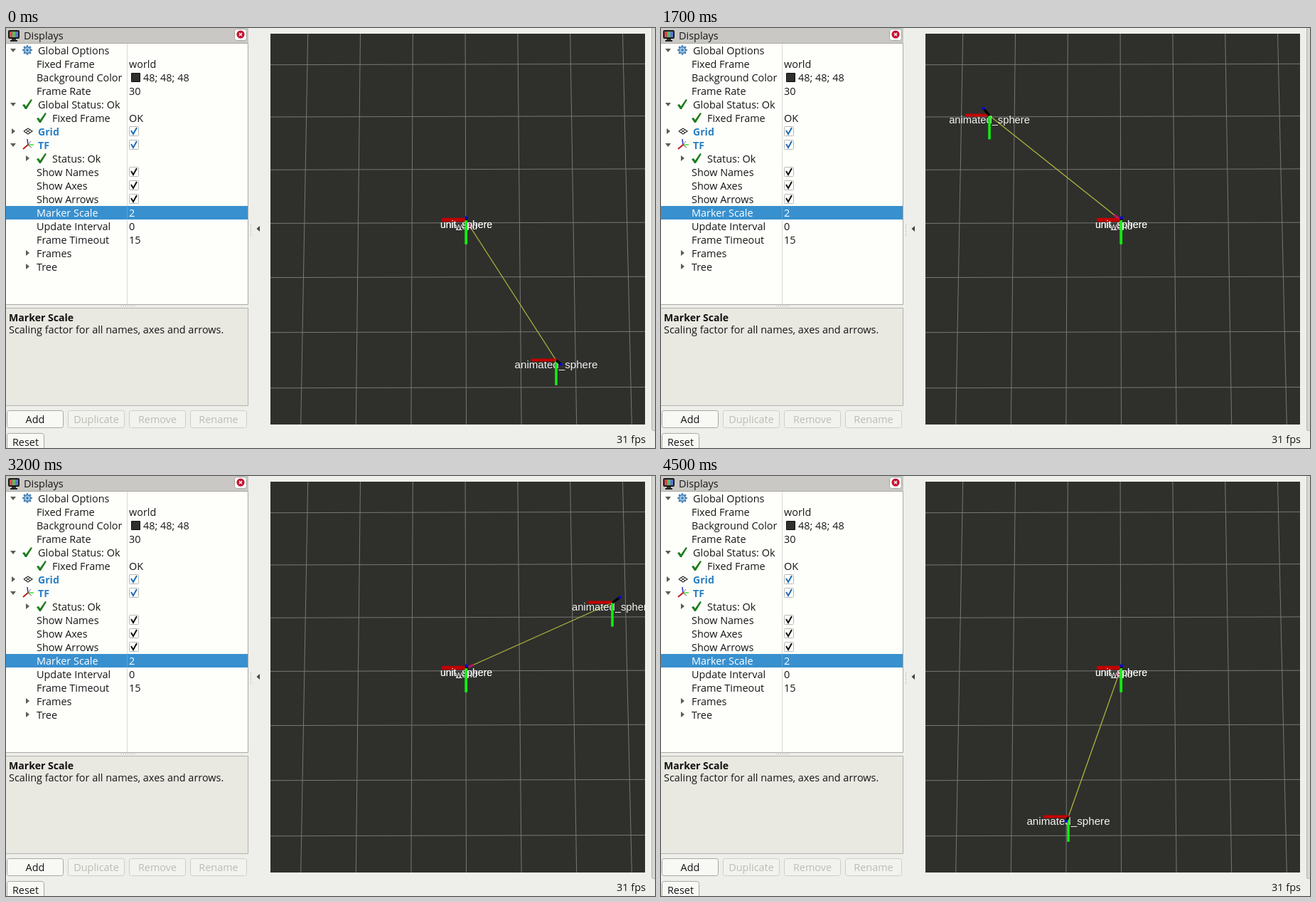
Animation, 913 px wide and 590 px high, one loop 4.7 s. Source, as an HTML page with a canvas:

```html
<!DOCTYPE html>
<html lang="en">
<head>
<meta charset="utf-8">
<title>Displays</title>
<style>
html, body { margin: 0; width: 913px; height: 590px; overflow: hidden; }
canvas { display: block; }
</style>
</head>
<body>
<canvas id="stage" width="913" height="590"></canvas>
<script>
const ctx = document.getElementById('stage').getContext('2d');
const UI = '14.45px "Open Sans", sans-serif';
const UI_BOLD = 'bold 14.1px "Open Sans", sans-serif';
const LOOP = 4700, TICK = 100;
const CENTER = { x: 647, y: 270 };

// Ticks on which the tracked frame receives no update
const HOLDS = [6, 12, 16, 21, 31, 36, 46];
// [update count, x, y] of the moving frame
const KEYS = [
  [0, 774, 467], [5, 578.5, 481], [8, 462, 425], [10, 442.5, 360], [13, 442, 191],
  [14, 462, 123], [17, 529.5, 72], [19, 634, 57], [23, 787, 78], [26, 844, 142],
  [27, 853, 178], [30, 855, 347], [31, 839, 416], [36, 704.5, 482], [39, 573, 479]
];

const bulge = a => 225 - 15 * Math.cos(4 * a);
let turn = -Infinity;
const PATH = KEYS.map(([step, x, y]) => {
  let angle = Math.atan2(y - CENTER.y, x - CENTER.x);
  while (angle < turn) angle += 2 * Math.PI;
  turn = angle;
  return { step, angle, extra: Math.hypot(x - CENTER.x, y - CENTER.y) - bulge(angle) };
});

function position(time) {
  const tick = Math.floor(time / TICK);
  const step = tick - HOLDS.filter(h => h <= tick).length;
  const i = Math.max(1, PATH.findIndex(p => p.step >= step));
  const a = PATH[i - 1], b = PATH[i];
  const k = (step - a.step) / (b.step - a.step);
  const angle = a.angle + (b.angle - a.angle) * k;
  const r = bulge(angle) + a.extra + (b.extra - a.extra) * k;
  return { x: CENTER.x + r * Math.cos(angle), y: CENTER.y + r * Math.sin(angle) };
}

function rect(x, y, w, h, fill, border, radius = 0) {
  ctx.beginPath();
  const d = border ? 0.5 : 0;
  ctx.roundRect(x + d, y + d, w - 2 * d, h - 2 * d, radius);
  ctx.fillStyle = fill;
  ctx.fill();
  if (border) {
    ctx.strokeStyle = border;
    ctx.lineWidth = 1;
    ctx.stroke();
  }
}

function line(points, color, width = 1) {
  ctx.beginPath();
  for (let i = 0; i < points.length; i += 2) ctx.lineTo(points[i], points[i + 1]);
  ctx.strokeStyle = color;
  ctx.lineWidth = width;
  ctx.stroke();
}

function shape(points, color) {
  ctx.beginPath();
  for (let i = 0; i < points.length; i += 2) ctx.lineTo(points[i], points[i + 1]);
  ctx.fillStyle = color;
  ctx.fill();
}

function disc(x, y, r, color) {
  ctx.beginPath();
  ctx.arc(x, y, r, 0, 2 * Math.PI);
  ctx.fillStyle = color;
  ctx.fill();
}

function text(str, x, y, color = '#161616', font = UI, align = 'left') {
  ctx.font = font;
  ctx.textAlign = align;
  ctx.fillStyle = color;
  ctx.fillText(str, x, y);
}

const expander = (x, y, open) => shape(open
  ? [x - 4, y - 2, x + 4, y - 2, x, y + 3]
  : [x - 2, y - 4, x + 3, y, x - 2, y + 4], '#5c5c58');

const tick = (x, y) => shape(
  [x - 7, y + 1, x - 4, y, x - 2, y + 3, x + 5, y - 7, x + 7, y - 6, x - 1, y + 7, x - 3, y + 7], '#1d7d1d');

function checkbox(y, color) {
  rect(173, y - 7, 14, 14, '#fff', '#b9b8b2', 1);
  line([176, y - 1, 179, y + 4, 184, y - 5], color, 2);
}

function gear(x, y) {
  for (let i = 0; i < 8; i++) {
    const a = i * Math.PI / 4, c = Math.cos(a), s = Math.sin(a);
    line([x + 4 * c, y + 4 * s, x + 6.8 * c, y + 6.8 * s], '#3f78b0', 2.4);
  }
  disc(x, y, 5.2, '#4d88bf');
  disc(x, y, 3.6, '#a9cbea');
  disc(x, y, 1.8, '#3f78b0');
}

function gridIcon(x, y) {
  line([x - 6, y, x, y - 4, x + 6, y, x, y + 4, x - 6, y], '#333', 1.2);
  line([x - 3, y - 2, x + 3, y + 2], '#333');
  line([x + 3, y - 2, x - 3, y + 2], '#333');
}

function axesIcon(x, y) {
  line([x, y, x - 1, y - 8], '#2233bb', 1.5);
  line([x, y, x + 8, y], '#44dd33', 1.5);
  line([x, y, x - 7, y + 6], '#c01818', 2);
  line([x, y, x + 4, y - 5], '#777');
  line([x, y, x + 5, y + 4], '#555');
}

// [label, x, value, expander x, expanded]
const ROWS = [
  ['Global Options', 45, '', 10, true],
  ['Fixed Frame', 43, 'world'],
  ['Background Color', 43, '48; 48; 48'],
  ['Frame Rate', 43, '30'],
  ['Global Status: Ok', 45, '', 10, true],
  ['Fixed Frame', 65, 'OK'],
  ['Grid', 45, '#1f6db3', 10, false],
  ['TF', 45, '#1f6db3', 10, true],
  ['Status: Ok', 65, '', 30, false],
  ['Show Names', 43, '#111'],
  ['Show Axes', 43, '#111'],
  ['Show Arrows', 43, '#111'],
  ['Marker Scale', 43, '2'],
  ['Update Interval', 43, '0'],
  ['Frame Timeout', 43, '15'],
  ['Frames', 43, '', 30, false],
  ['Tree', 43, '', 30, false]
];

function drawTree() {
  rect(-1, 21, 342, 368, '#fefefb', '#aaa9a4');
  rect(170, 22, 1, 366, '#dad9d5');
  ROWS.forEach(([label, x, value, ex, open], i) => {
    const mid = 31 + 19 * i, base = mid + 6;
    const selected = label === 'Marker Scale', display = label === 'Grid' || label === 'TF';
    if (selected) {
      rect(0, mid - 9, 340, 19, '#3890ce');
      rect(170, mid - 9, 1, 19, '#5aa3d7');
    }
    const color = selected ? '#fff' : display ? '#2980c5' : '#161616';
    text(label, x, base, color, display ? UI_BOLD : UI);
    if (ex) expander(ex, mid, open);
    if (value[0] === '#') checkbox(mid, value);
    else text(value, i === 2 ? 193 : 173, base, color);
  });
  rect(176, 63, 13, 13, '#2f302c', '#111');
  gear(30, 31);
  tick(30, 107);
  tick(50, 126);
  tick(50, 183);
  gridIcon(31, 145);
  axesIcon(31, 164);
}

function button(label, x, y, w, enabled) {
  rect(x, y, w, 25, enabled ? '#f8f8f5' : '#f2f2ee', enabled ? '#a9a8a2' : '#cecdc7', 3);
  text(label, x + w / 2, y + 18, enabled ? '#161616' : '#bdbcb6', UI, 'center');
}

function drawPanel() {
  rect(0, 0, 913, 590, '#eeeeea');
  rect(0, 0, 341, 21, '#c9c8c4');
  rect(3, 3, 16, 12, '#222', '#111', 1);
  ['#d05050', '#60b860', '#5878d0'].forEach((c, i) => rect(5 + 4 * i, 5, 4, 8, c));
  rect(8, 15, 6, 2, '#333');
  rect(6, 17, 10, 2, '#222');
  text('Displays', 25, 16);
  rect(321, 1, 18, 17, '#f8f8f6', '#aaa9a4', 3);
  disc(330, 9, 5.5, '#c4112d');
  line([328, 7, 332, 11], '#fff', 1.5);
  line([332, 7, 328, 11], '#fff', 1.5);
  drawTree();
  for (let x = 162; x < 181; x += 3) rect(x, 390, 1, 1, '#aaa9a4');
  rect(-1, 393, 342, 138, '#e9e8e1', '#b3b2ac');
  text('Marker Scale', 4, 412, '#111', UI_BOLD);
  text('Scaling factor for all names, axes and arrows.', 4, 429);
  ['Add', 'Duplicate', 'Remove', 'Rename'].forEach((s, i) => button(s, 1 + 86 * i, 537, 80, i === 0));
  button('Reset', 1, 569, 53, true);
  for (let y = 276; y < 293; y += 3) rect(344, y, 1, 1, '#aaa9a4');
  shape([357, 278, 357, 286, 352.5, 282], '#444');
  rect(908, -2, 8, 568, '#d7d6d1', '#b3b2ac', 2);
  text('31 fps', 900, 583, '#161616', UI, 'right');
}

function drawGrid() {
  rect(372, 8, 527, 549, '#2f302c');
  for (let i = 0; i < 7; i++) {
    line([424.7 + 73.8 * i, 8, 414.7 + 77.6 * i, 557], '#777774');
    const y = 51.7 + 72.8 * i + 0.48 * i * i;
    line([372, y, 899, y - 1.3], '#777774');
  }
}

const label = (str, x, y, size) =>
  text(str, x, y, '#f4f4f4', `${size}px "Liberation Sans", Arial, sans-serif`, 'center');

function drawAxes(x, y, redWidth) {
  const dx = x - CENTER.x, dy = y - CENTER.y;
  const length = 34 + 0.004 * dy;
  const zx = 0.5 + 0.049 * dx, zy = -3.5 + 0.045 * dy;
  line([x - length - 0.5, y - 0.5, x + 1, y - 0.5], '#c40000', redWidth);
  line([x, y, x, y + length], '#10f010', 3.5);
  line([x, y, x + zx, y + zy], '#050505', 3.5);
  disc(x + zx, y + zy, 2.2, '#0808d8');
}

function drawArrow(x, y) {
  const dx = x - CENTER.x, dy = y - CENTER.y, d = Math.hypot(dx, dy);
  const at = r => [CENTER.x + dx / d * r, CENTER.y + dy / d * r];
  line([x, y, ...at(11)], '#b2b43c', 1.3);
  line([...at(4), ...at(12)], '#c3125f', 3);
}

function drawScene(time) {
  const { x, y } = position(time);
  ctx.save();
  ctx.beginPath();
  ctx.rect(372, 8, 527, 549);
  ctx.clip();
  drawGrid();
  line([613.5, 269.5, 647, 269.5], '#c40000', 5.5);
  drawArrow(x, y);
  label('unit_sphere', 647.5, 280.5, 14);
  label('world', 647.5, 283, 13);
  drawAxes(CENTER.x + 0.3, CENTER.y, 2);
  label('unit_sphere', 647.5, 280.5, 14);
  line([647.3, 271, 647.3, 303], '#10f010', 3.5);
  label('animated_sphere', x, y + 10.8, 14.9 + 0.00125 * (y - CENTER.y));
  drawAxes(x, y, 4);
  ctx.restore();
}

function frame(now) {
  drawPanel();
  drawScene(now % LOOP);
  requestAnimationFrame(frame);
}
requestAnimationFrame(frame);
</script>
</body>
</html>
```
